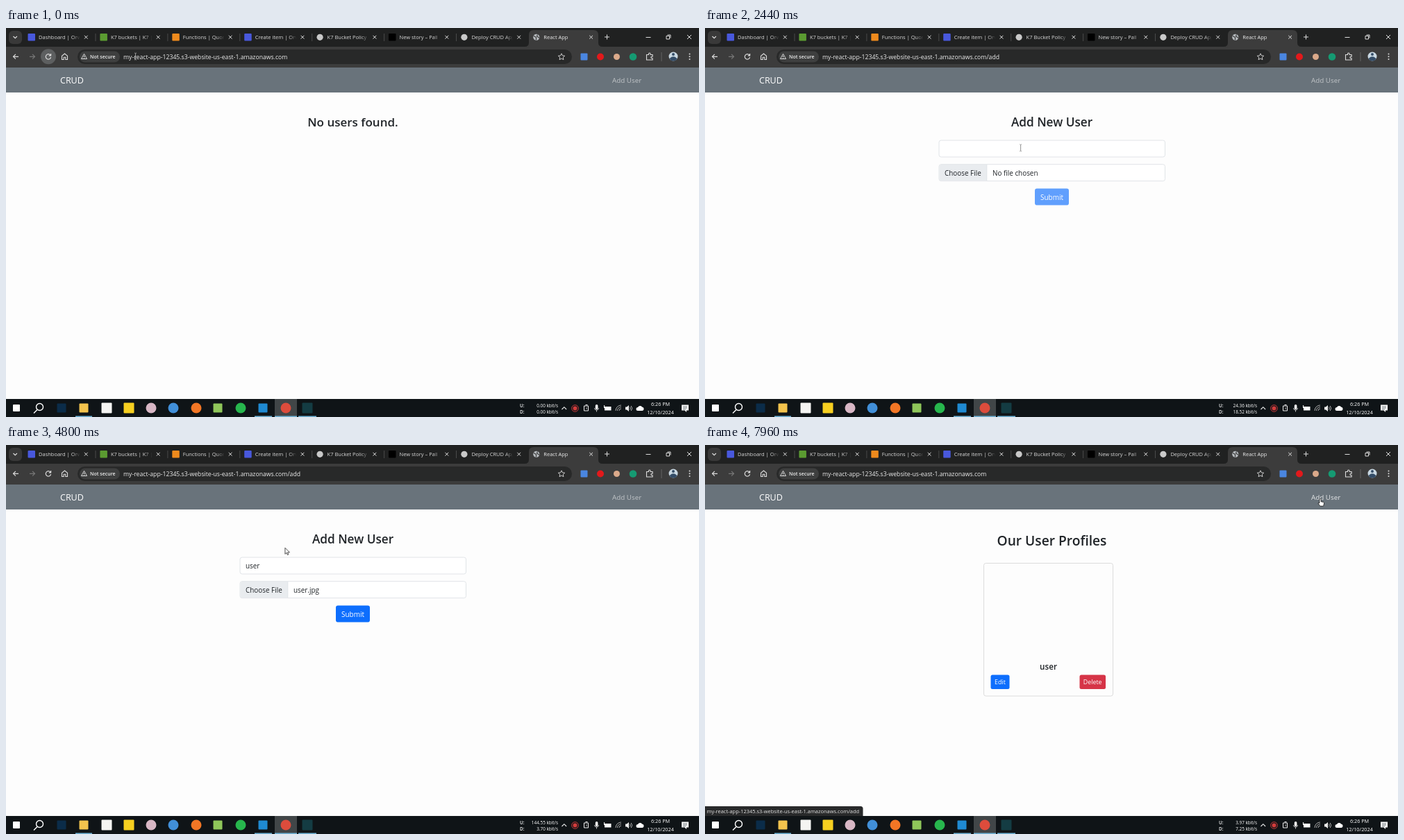
An HTML page that plays this animation: 998 px wide and 561 px high, repeating every 8000 ms.

```html
<!DOCTYPE html>
<html lang="en">
<head>
<meta charset="utf-8">
<title>User profiles demo</title>
<style>
html, body { margin: 0; width: 100%; height: 100%; overflow: hidden; background: #fdfdfd; }
svg { display: block; font-family: "Open Sans", "Noto Sans", sans-serif; }
text { white-space: pre; }
</style>
</head>
<body>
<svg id="stage" width="998" height="561" viewBox="0 0 998 561"></svg>
<script>
const LOOP = 8000;
const URL_HOME = 'my-react-app-12345.s3-website-us-east-1.amazonaws.com';

// Drawing helpers return SVG markup
const text = (x, y, s, size, fill = '#fff', more = '') =>
  `<text x="${x}" y="${y}" font-size="${size}" fill="${fill}" ${more}>${s}</text>`;
const rect = (x, y, w, h, fill, r = 0, more = '') =>
  `<rect x="${x}" y="${y}" width="${w}" height="${h}" fill="${fill}" rx="${r}" ${more}/>`;
const dot = (x, y, r, fill, more = '') => `<circle cx="${x}" cy="${y}" r="${r}" fill="${fill}" ${more}/>`;
const line = (d, color = '#dcdcdc', w = 1, more = '') =>
  `<path d="${d}" fill="none" stroke="${color}" stroke-width="${w}" ${more}/>`;
const shape = (d, fill, more = '') => `<path d="${d}" fill="${fill}" ${more}/>`;
const group = (id, body, more = '') => `<g id="${id}" ${more}>${body}</g>`;
const cross = (x, y, r, color) =>
  line(`M${x - r} ${y - r}l${2 * r} ${2 * r}m0 ${-2 * r}l${-2 * r} ${2 * r}`, color);
const MID = 'text-anchor="middle"', END = 'text-anchor="end"', BOLD = 'font-weight="600"';

function tabs() {
  const list = [
    ['Dashboard | Orvi', '#4858dc'], ['K7 buckets | K7 |', '#5b9b31'],
    ['Functions | Quorl', '#ee8a1d'], ['Create item | Orv', '#4858dc'],
    ['K7 Bucket Policy', '#c9c9c9'], ['New story – Pall', '#000'],
    ['Deploy CRUD App', '#c9c9c9'], ['React App', '#b4b8bc']
  ];
  let clips = '', out = shape('M747 27q6 0 6-6v-11q0-7 7-7h86q7 0 7 7v11q0 6 6 6z', '#3c3c3c');
  list.forEach(([title, color], i) => {
    const x = i * 103.9, active = i === 7;
    clips += `<clipPath id="clip${i}"><rect x="${46 + x}" y="4" width="60" height="20"/></clipPath>`;
    out += i === 4 || i > 5 ? dot(36.5 + x, 13.3, 4.6, color) : rect(31.5 + x, 8, 10.5, 10.5, color, 1);
    out += text(47 + x, 16.2, title, 7.5, active ? '#eee' : '#d8d8d8', `clip-path="url(#clip${i})"`);
    if (!active) out += rect(96 + x, 5, 11, 18, 'url(#fade)');
    out += cross(115.3 + x, 13.2, 2.4, '#ddd');
    if (i < 6) out += rect(128.5 + x, 8, 1, 11, '#4a4a4a');
  });
  // Globe icon of the active tab
  out += line('M760 11.500l3.500 2v4m2-8l-1 2.500 4 2.500', '#3c3c3c', 1.2);
  return `<defs>${clips}</defs>` + out;
}

function browser() {
  return rect(0, 0, 998, 28, '#202121') + tabs() +
    rect(4, 4, 19, 19, '#393939', 6) + line('M10.5 12l2.7 2.7 2.7-2.7', '#ddd', 1.2) +
    line('M865.5 9.5v7m-3.5-3.5h7') +
    group('controls', line('M921.5 13.5h7') + line('M951 11.5h4.5v4.5h-4.5zm1.5-1.5h4.5v4.5') +
      cross(984, 13, 3, '#e4e4e4')) +
    rect(0, 27, 998, 30, '#3c3c3c') +
    line('M18 41.3h-7.5m3.4-3.4l-3.4 3.4 3.4 3.4', '#dcdcdc', 1.2) +
    line('M34 41.3h7.5m-3.4-3.4l3.4 3.4-3.4 3.4', '#777', 1.2) +
    dot(61, 41.3, 11, '#5d5f60', 'id="reload"') +
    line('M64 39.3a3.7 3.7 0 1 0 .6 2.8m0-5v2.8h-2.8', '#dcdcdc', 1.2) +
    line('M80.5 45.5v-5.2l4-3.3 4 3.3v5.2h-2.7v-3.2h-2.6v3.2z', '#dcdcdc', 1.1) +
    rect(103, 31, 712, 21, '#282929', 10.5) + rect(106, 33.5, 58, 16, '#3e3f3f', 8) +
    line('M112.5 37.3l4 7.2h-8zm0 2.7v2.2m0 .7v.9', '#e8e8e8', .9) +
    text(121, 44, 'Not secure', 7, '#eee', BOLD) +
    text(169, 44.6, '', 8.69, '#ececec', 'id="url"') +
    line('M800 36.8l1.4 3 3.3.4-2.4 2.2.6 3.3-2.9-1.7-2.9 1.7.6-3.3-2.4-2.2 3.3-.4z', '#ddd', .9) +
    rect(827.5, 36.5, 10, 10, '#4a86e0', 1) + dot(856, 41.5, 5, '#e3191b') +
    dot(879.5, 41.5, 4.5, '#dba98a') + dot(903, 41.5, 5.3, '#159a72') +
    line('M922.5 38.5h3v-1.2a1.3 1.3 0 0 1 2.6 0v1.2h3v2.8h-1a1.2 1.2 0 0 0 0 2.4h1v2.3h-8.6z', '#ddd', 1.1) +
    rect(943.5, 35, 1, 13, '#626262') +
    dot(961, 41, 6.5, '#c9d8e2') + shape('M955.8 45a5.5 5.5 0 0 1 10.4 0a6.5 6.5 0 0 1-10.4 0z', '#344d68') +
    dot(961, 38, 2, '#344d68') +
    dot(984.5, 37.5, 1, '#ddd') + dot(984.5, 41.2, 1, '#ddd') + dot(984.5, 45, 1, '#ddd');
}

function page() {
  const field = y => rect(337, y, 325.5, 24, '#fff', 3, 'stroke="#dee1e6" stroke-width=".9"');
  return rect(0, 57, 998, 478, '#fdfdfd') + rect(0, 56.5, 998, 36.5, '#69737b') +
    text(78, 80, 'CRUD', 12.5) + text(873, 79, 'Add User', 9.85, '#fff', 'id="link"') +
    group('empty', text(499.5, 142.3, 'No users found.', 17, '#212529', MID + ' ' + BOLD)) +
    group('form',
      text(499.5, 142.3, 'Add New User', 17.2, '#212529', MID + ' ' + BOLD) +
      field(162) + text(345, 178, '', 9.9, '#212529', 'id="name"') + rect(345, 169, .8, 11, '#222', 0, 'id="caret"') +
      field(196.7) + shape('M340 197h66v23.5h-66q-2.6 0-2.6-2.6v-18.3q0-2.6 2.6-2.6z', '#e9ecef', 'id="choose"') +
      rect(405.5, 197, .8, 23.5, '#dee1e6') +
      text(345, 213, 'Choose File', 9.9, '#212529') + text(414, 213, '', 9.9, '#212529', 'id="file"') +
      rect(473.3, 229.8, 52.4, 27.4, '#86b6fe', 4.5, 'id="ring"') +
      group('submit', rect(475, 231.5, 49, 24, '#0d6efd', 3) + text(499.5, 247.7, 'Submit', 9.95, '#fff', MID))) +
    group('profiles',
      text(499.5, 145, 'Our User Profiles', 19.2, '#212529', MID + ' ' + BOLD) +
      rect(401.5, 170.5, 186, 191.5, '#fdfdfd', 3, 'stroke="#d9d9d9" stroke-width=".9"') +
      text(494.5, 323.7, 'user', 11.7, '#212529', MID + ' ' + BOLD) +
      rect(411.5, 331.5, 27, 20.5, '#0d6efd', 2.5) + text(425, 345, 'Edit', 8.9, '#fff', MID) +
      rect(539.5, 331.5, 37.5, 20.5, '#d63447', 2.5) + text(558.2, 345, 'Delete', 8.9, '#fff', MID)) +
    group('status', shape('M0 521h224q3.5 0 3.5 3.5v10.5h-227.5z', '#292a2b') +
      text(2.5, 531, URL_HOME + '/add', 7.48, '#e4e4e4'));
}

function sidebar() {
  const rows = ['This PC', '3D Objects', 'Desktop', 'Documents', 'Downloads', 'Music', 'Pictures',
    'Videos', 'Primary  (C:)', 'CD Drive (D:)', 'Backup Personal', 'Backup Project &amp; Files'];
  let out = rect(4, 63, 92, 191, '#191919') + rect(24, 99.5, 71, 14.5, '#363636');
  rows.forEach((s, i) => {
    const y = 76 + i * 15.6;
    out += text(i ? 38.5 : 33.5, y + 2.8, s, 7.4, '#eee');
    if (i > 7) out += rect(27, y - 4.5, 7.5, 9, '#f4f4f4', 1);
  });
  return out + rect(26, 103.5, 9.5, 7, '#269be8', 1) +
    rect(27, 118, 7.5, 9, '#d9eef5', 1) + line('M28.5 121h4.5m-4.5 2h4.5', '#3b8db5') +
    dot(29, 156.5, 1.8, '#2c9af0') + line('M30.5 156.5v-6l3 2.5', '#2c9af0', 1.1) +
    rect(26, 166, 9.5, 7, '#d8ecf4', 1) + shape('M27 172l3-3.5 2 2 1.5-1 1 2.5z', '#3386b8');
}

function dialog() {
  const name = (x, y, s) => text(x, y, s, 7.36, '#f0f0f0', MID);
  return rect(2, 1, 588, 311, '#000', 3, 'opacity=".1"') +
    rect(4, 0, 581, 307.5, '#202020') + rect(4, 0, 581, 20, '#000') + rect(4, 43, 581, 20, '#191919') +
    dot(14.5, 10, 5, '#db4b3b') + text(22, 13, 'Open', 7.5, '#eee') + cross(573.5, 10, 3, '#eee') +
    rect(5, 20, 580, 22.5, '#fff') +
    rect(541, 49, 9.5, 7, '#f1f1f1') + rect(546, 49.5, 4, 6, '#3d9ecb') +
    dot(569.5, 52.5, 5, '#0877c8') + text(569.5, 55.5, '?', 8, '#fff', MID + ' ' + BOLD) +
    '<clipPath id="side"><rect x="4" y="63" width="92" height="190"/></clipPath>' +
    `<g clip-path="url(#side)">${sidebar()}</g>` +
    rect(96, 63, 9.5, 191, '#181818') + rect(96, 133.5, 9.5, 74, '#4b4b4b') +
    line('M98.5 69.5l2.2-2.2 2.2 2.2m-4.4 179l2.2 2.2 2.2-2.2', '#aaa') +
    rect(350.5, 67, 68.5, 76.5, '#505050', 0, 'id="hover"') +
    shape('M132 75h15l3 4h10v46h-28z', '#f3d27a') +
    shape('M147 82l12-2v44l-12 4z', '#f7f7f5') + shape('M160 82l11-2v42l-11 5z', '#eef3f5') +
    shape('M131 76l16 8v45l-16-7z', '#fae09a') + shape('M146 95h4v9h4l-6 7-6-7h4z', '#3d8fa5') +
    name(152.5, 139, 'aws-serverless-cr') + name(152.5, 149.5, 'ud-app-module-') + name(152.5, 160, 'dynamodb-s3') +
    dot(228.5, 98.5, 26, '#2745cb') + name(229.5, 139, 'aws.png') +
    rect(277.5, 70, 57, 57, '#e9e8ea') + rect(291, 75, 29, 29, '#e5483f') +
    text(306, 117, 'Sunfern', 6.4, '#444', MID) + name(307, 139, 'sunfern.jpg') +
    rect(355, 70, 57, 57, '#fff') + dot(383.5, 89, 9, '#000') +
    shape('M368 113c0-8 5-12 10-14q5.5 4 11 0c5 2 10 6 10 14q-15.5 7-31 0z', '#000') + name(385, 139, 'user.jpg') +
    rect(4, 254.5, 581, 53, '#333') + rect(81.5, 265.5, 35, 10.5, '#fff') +
    rect(119.5, 263.5, 325, 15, '#fff') + rect(452, 263.5, 122.5, 14.5, '#fff') +
    rect(452, 282, 57.5, 17.5, '#fff') + rect(517, 282, 57.5, 17.5, '#fff') + rect(574, 296, 11, 11.5, '#fff') +
    line('M4.5 0v307h580.5v-307', '#555', .8);
}

function taskbar() {
  const squares = [[15, '#fff', 10], [80, '#0b2c49', 13], [112, '#f3c34d', 13], [145, '#f4f4f2', 15],
    [177, '#f6cf20', 15], [305, '#8fc65a', 13], [370, '#1f8ad2', 13], [434, '#143c43', 15]];
  const circles = [[209, '#d8b7c5'], [241, '#418fd8'], [274, '#f27625'], [338, '#27b64d'], [403, '#dd4c3c']];
  let out = rect(0, 535, 998, 26, '#0f1417') + rect(387, 535, 32, 26, '#414648');
  squares.forEach(([x, c, s]) => out += rect(x - s / 2, 548 - s / 2, s, s, c, 1));
  circles.forEach(([x, c]) => out += dot(x, 548, 7.5, c));
  [[100, 24], [358, 25], [387, 32], [421, 26]].forEach(([x, w]) => out += rect(x, 559.5, w, 1.5, '#71b5d9'));
  return out + dot(48.5, 546.5, 5, 'none', 'stroke="#fff" stroke-width="1.4"') + line('M45 550.5l-5 5', '#fff', 1.5) +
    text(740, 547, 'U:', 6.4, '#fff', BOLD) + text(740, 556, 'D:', 6.4, '#fff', BOLD) +
    text(795, 547, '', 6.4, '#fff', 'id="up" ' + END) + text(795, 556, '', 6.4, '#fff', 'id="down" ' + END) +
    line('M800.5 550l3.3-3.3 3.3 3.3', '#eee', 1.1) +
    dot(819.5, 548.5, 4.8, 'none', 'stroke="#d13b3b"') + dot(819.5, 548.5, 3, '#d13b3b') +
    line('M832.5 545h6v7h-6zm2-1.5h3m-1.5 4v2', '#eee') +
    rect(848.8, 543, 3.6, 7, '#fff', 1.8) + line('M847.5 548q0 3 3 3t3-3m-3 3v2.5', '#eee', .8) +
    rect(862, 546, 9.5, 5.5, '#fff') + line('M861.5 544v4', '#fff') +
    line('M878 552a8 8 0 0 1 8-8m-5.5 8a5.5 5.5 0 0 1 5.5-5.5m-3 5.5a3 3 0 0 1 3-3', '#aaa') +
    shape('M892 546.5h2l3-2.5v9l-3-2.5h-2z', '#eee') +
    line('M898.5 546.5q1.5 2 0 4m1.8-5.5q2.7 3.5 0 7', '#ddd', .8) +
    shape('M910 552a2.5 2.5 0 0 1 0-5a3.5 3.5 0 0 1 6-.5a2.8 2.8 0 0 1 .5 5.5z', '#fff') +
    text(942.5, 545, '6:26 PM', 7.25, '#fff', MID) + text(942.5, 556.5, '12/10/2024', 7.3, '#fff', MID) +
    shape('M973 543.5h10v8h-3v2.5l-2.5-2.5h-4.5z', '#fff') +
    line('M975 546h6m-6 2h6m-6 2h4', '#39424a', .7);
}

const cursors =
  group('arrow', shape('M0 0v9l2.1-2 1.4 3.2 1.5-.7-1.4-3h2.9z', '#fff', 'stroke="#222" stroke-width=".8"')) +
  group('hand', shape('M0 0c.9 0 1.1.6 1.1 1.2v3l3.2.6c.9.2 1.3.7 1.2 1.6l-.5 3.2c-.1.6-.5 1-1.1 1h-3.4c-.5 0-.8-.2-1.1-.6l-2.5-3.6c.5-.7 1.2-.6 2 .1v-5.3c0-.6.3-1.2 1.1-1.2z',
    '#fff', 'stroke="#111" stroke-width=".8"')) +
  group('beam', line('M-1.5-5q1.5 0 1.5 1v8q0 1-1.5 1m3-10q-1.5 0-1.5 1v8q0 1 1.5 1', '#999', .9));

document.getElementById('stage').innerHTML =
  '<defs><linearGradient id="fade"><stop stop-color="#202121" stop-opacity="0"/><stop offset="1" stop-color="#202121"/></linearGradient></defs>' +
  page() + browser() + group('dialog', dialog()) + taskbar() +
  group('pulse', dot(0, 0, 5, '#a5e4e8', 'id="halo"') + dot(0, 0, 1.6, '#35a8b0')) +
  group('cursor', cursors);

const el = {};
document.querySelectorAll('[id]').forEach(n => el[n.id] = n);
const show = (id, on) => el[id].style.display = on ? '' : 'none';
const put = (id, s) => { if (el[id].textContent !== s) el[id].textContent = s; };
const clamp = v => Math.max(0, Math.min(1, v));
const latest = (steps, t) => steps.filter(s => s[0] <= t).pop();

// Pointer stops: time, x, y
const path = [[0, 186.5, 41], [240, 200, 42], [900, 560, 88], [1480, 764.5, 102.5], [1680, 764.5, 102.5],
  [1960, 886, 77.5], [2120, 886, 77.5], [2480, 440, 176], [3060, 440, 176], [3420, 479, 202],
  [3800, 479, 202], [4240, 382, 131.5], [4640, 382, 131.5], [5280, 508, 238], [5960, 508, 238],
  [6800, 886, 77.5], [8000, 886, 77.5]];
const clicks = [2040, 2500, 3440, 4400, 4520, 5400];
// Network meter: time, upload, download
const traffic = [[0, '0.00', '0.00'], [800, '77.19', '12.19'], [1800, '24.36', '18.52'], [2800, '12.17', '211.42'],
  [3800, '13.54', '13.16'], [4800, '144.55', '3.70'], [5800, '9.28', '6.41'], [6800, '1.63', '4.33'], [7800, '3.97', '7.25']];
const OPEN_FORM = 2120, OPEN_DIALOG = 3720, PICKED = 4600, SAVED = 5840, TYPE_START = 2680;

function pointerAt(t) {
  const i = Math.max(1, path.findIndex(p => p[0] > t));
  const [a, x, y] = path[i - 1], [b, u, v] = path[i];
  const k = clamp((t - a) / (b - a)), e = k * k * (3 - 2 * k);
  return [x + (u - x) * e, y + (v - y) * e];
}

function draw(t) {
  const [x, y] = pointerAt(t);
  const inside = (l, top, r, bottom) => x >= l && x <= r && y >= top && y <= bottom;
  const form = t >= OPEN_FORM && t < SAVED, picking = t >= OPEN_DIALOG && t < PICKED;
  const picked = t >= PICKED, pressed = t >= 5400;
  const onLink = inside(866, 66, 922, 85), onFile = form && !picking && inside(337, 197, 662, 221);
  const onSubmit = form && picked && inside(475, 232, 524, 256);

  show('empty', t < OPEN_FORM);
  show('form', form);
  show('profiles', t >= SAVED);
  show('dialog', picking);
  el.controls.setAttribute('opacity', picking ? .5 : 1);
  put('url', URL_HOME + (form ? '/add' : ''));
  put('name', 'user'.slice(0, Math.max(0, Math.floor((t - TYPE_START) / 110) + 1)));
  put('file', picked ? 'user.jpg' : 'No file chosen');
  show('caret', t >= 2500 && t < TYPE_START);
  show('ring', pressed);
  el.choose.setAttribute('fill', onFile ? '#dde0e3' : '#e9ecef');
  el.submit.setAttribute('opacity', picked ? 1 : .65);
  el.submit.firstChild.setAttribute('fill', onSubmit ? '#0b5bd0' : '#0d6efd');
  show('hover', inside(351, 67, 419, 143));
  el.reload.setAttribute('opacity', clamp(1 - (t - 40) / 160));

  el.link.setAttribute('fill-opacity', onLink ? .82 : .58);
  const status = t < 4000 ? (onLink && t < OPEN_FORM ? clamp((t - 1920) / 160) : 0) : clamp((t - 6840) / 180);
  el.status.setAttribute('opacity', status);

  const [, up, down] = latest(traffic, t);
  put('up', up + ' kbit/s');
  put('down', down + ' kbit/s');

  const beam = inside(168, 32, 790, 51) || (form && !picking && inside(337, 162, 662, 186));
  const hand = !beam && (onLink || onFile || onSubmit);
  show('beam', beam);
  show('hand', hand);
  show('arrow', !beam && !hand);
  el.cursor.setAttribute('transform', `translate(${x} ${y})`);

  const click = clicks.find(c => t >= c && t < c + 200);
  show('pulse', click !== undefined);
  if (click !== undefined) {
    const k = (t - click) / 200;
    el.halo.setAttribute('r', 3 + 6 * k);
    el.pulse.setAttribute('opacity', 1 - .6 * k);
    el.pulse.setAttribute('transform', `translate(${x - 1} ${y - 1})`);
  }
}

const start = performance.now();
function tick() {
  draw((performance.now() - start) % LOOP);
  requestAnimationFrame(tick);
}
tick();
</script>
</body>
</html>
```
